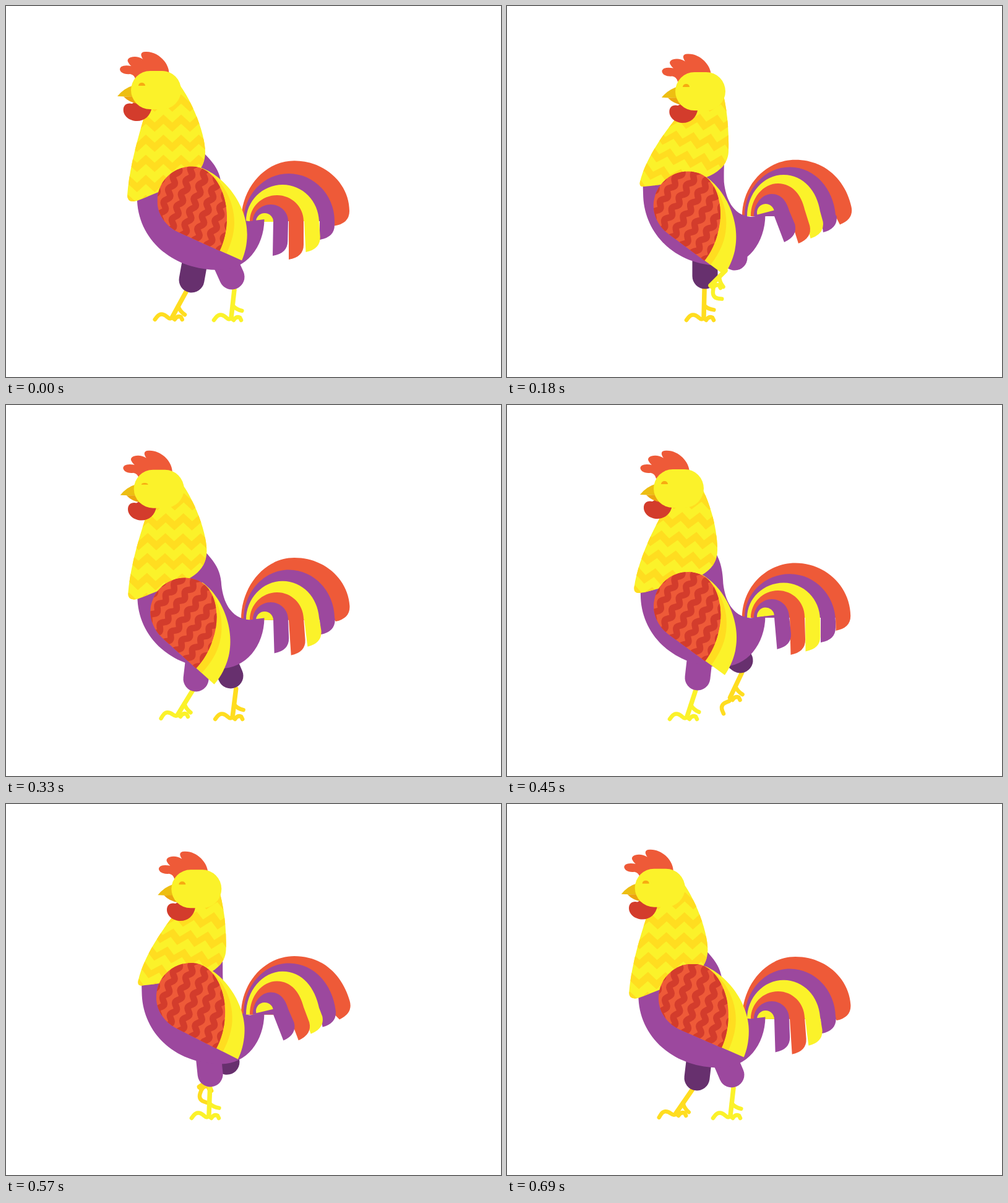
These frames come from a looping animation (800x600 px, 0.72 s). An HTML page:

```html
<!DOCTYPE html>
<html lang="en">
<head>
<meta charset="utf-8">
<title>Walking rooster</title>
<style>
html, body { margin: 0; width: 100%; height: 100%; overflow: hidden; background: #fff; }
svg { display: block; width: 100vw; height: 100vh; }
.line { fill: none; stroke-linecap: round; stroke-linejoin: round; }
</style>
</head>
<body>
<svg id="stage" viewBox="0 0 800 600">
  <defs>
    <clipPath id="neckClip"><path id="neckEdge"/></clipPath>
    <clipPath id="wingClip"><path d="M301 259C335 259 358 300 358 342C358 362 354 380 347 395L278 365C258 355 245 336 245 315C245 284 270 259 301 259Z"/></clipPath>
  </defs>
  <g id="tail"></g>
  <g id="farLeg"></g>
  <g id="nearLeg"></g>
  <path id="body" fill="#9c489e"/>
  <path id="neck" fill="#fbf22a"/>
  <path id="chevrons" fill="#ffdd20" clip-path="url(#neckClip)"/>
  <path id="comb" fill="#ee5a38" d="M264 109C264 92 246 73 226 74Q218 74 219 80Q220 84 222 86Q212 80 202 83Q195 86 198 91Q200 95 203 97Q192 95 187 98Q182 102 187 107Q193 111 201 110Q208 111 210 119L240 125Z"/>
  <path id="wattle" fill="#d33c2c" d="M234 164C232 178 222 186 210 186C198 186 188 178 188 168C188 160 194 156 202 158L215 150L234 160Z"/>
  <g id="head">
    <path fill="#edbe12" d="M180 146Q190 133 207 128V147Z"/>
    <path fill="#eda410" d="M190 146.500Q199 156 213 158V146.500Z"/>
    <rect x="202" y="105" width="81" height="62" rx="31" fill="#fbf22a"/>
    <path id="eye" fill="#f7aa12" d="M-5.500 0A5.500 5 0 0 1 5.500 0Z"/>
  </g>
  <g id="wing">
    <path fill="#fbf22a" d="M312 260C352 272 391 320 391 368C391 384 388 398 383 410L300 374Z"/>
    <path fill="#ffdd20" d="M312 260C345 272 370 310 370 350C370 368 364 386 358 399L300 374Z"/>
    <g clip-path="url(#wingClip)">
      <rect x="240" y="255" width="125" height="145" fill="#ee5a38"/>
      <path id="waves" class="line" stroke="#d33c2c" stroke-width="10.500" transform="translate(301 315) rotate(19)"/>
    </g>
  </g>
</svg>
<script>
const LOOP = 720, STEP = 30, TAU = Math.PI * 2;
const ORANGE = '#ee5a38', PURPLE = '#9c489e', YELLOW = '#fbf22a';
const $ = id => document.getElementById(id);
const put = (el, name, value) => el.setAttribute(name, value);
const move = (el, x, y, extra = '') => put(el, 'transform', `translate(${x} ${y}) ${extra}`);
const mix = (a, b, k) => a + (b - a) * k;

function add(parent, attrs) {
  const el = document.createElementNS('http://www.w3.org/2000/svg', 'path');
  for (const name in attrs) put(el, name, attrs[name]);
  parent.appendChild(el);
  return el;
}

// Each feather: base x, top x, inner x; swing triples are mean, cosine and sine parts.
const feathers = [
  { color: ORANGE, base: 380, mid: 466, inner: 531, top: [249.5, .7, 6], tipX: [534.5, -3.5, -3], tipY: [354.5, 1, 10.5] },
  { color: PURPLE, base: 384, mid: 457, inner: 507, top: [265.8, 5.2, 7.5], tipX: [509, -2, -2], tipY: [372, 6, 12] },
  { color: YELLOW, base: 388, mid: 447, inner: 482, top: [281, 8, 6.5], tipX: [487.5, -3, -5], tipY: [387, 11, 11.5] },
  { color: ORANGE, base: 394, mid: 438, inner: 457, top: [296.5, 9.5, 3.5], tipX: [464, -7, -5.5], tipY: [397, 13, 7] },
  { color: PURPLE, base: 399, mid: 428, inner: 432, top: [312.5, 8.5, 1.5], tipX: [439.5, -8.5, -3], tipY: [393, 11, 2] }
];
for (const f of feathers) f.el = add($('tail'), { fill: f.color });
const bud = add($('tail'), { fill: YELLOW, d: 'M-14 0A14 14 0 0 1 14 0Z' });

function drawTail(a, h) {
  const swing = ([m, c, s]) => m + c * Math.cos(a) + s * Math.sin(a);
  const by = 348 - 8 * h, k = .55;
  for (const f of feathers) {
    const ty = swing(f.top), x = swing(f.tipX), y = swing(f.tipY);
    const len = Math.hypot(x - f.inner, y - 320);
    const ux = (x - f.inner) / len, uy = (y - 320) / len;
    const sx = x + 24 * (uy - ux), sy = y - 24 * (ux + uy);
    const rx = f.inner + 24, ry = Math.min(348 + ty - f.top[0] - f.top[1], sy);
    const ex = ry === sy ? sx : rx, bend = k * (ry - ty);
    put(f.el, 'd', `M${f.base} ${by}C${f.base} ${mix(by, ty, k)} ${mix(f.mid, f.base, k)} ${ty} ${f.mid} ${ty}` +
      `C${mix(f.mid, ex, k)} ${ty} ${ex - ux * bend} ${ry - uy * bend} ${ex} ${ry}L${sx} ${sy}` +
      `Q${sx + ux * 20} ${sy + uy * 20} ${x} ${y}L${f.inner} ${by}Z`);
  }
  move(bud, 418, 349 - 15 * h, `rotate(${-14 * h})`);
}

// Time, knee x y, shin top x y, ankle x y, front toe angle.
const gait = [
  [0, 365, 438, 369, 459, 364, 504, 0],
  [90, 377, 413, 373, 433, 356, 473, -60],
  [150, 375, 400, 364, 420, 343, 447, -100],
  [180, 368, 407, 353, 428, 329, 452, -122],
  [270, 333, 437, 321, 452, 284, 471, -62],
  [330, 307, 443, 302, 461, 278, 500, -6],
  [360, 300, 443, 294, 462, 274, 503, 0],
  [450, 308, 441, 305, 461, 291, 504, 0],
  [510, 315, 437, 314, 458, 308, 504, 0],
  [540, 320, 437, 319, 457, 318, 504, 0],
  [630, 351, 437, 352, 458, 347, 504, 0],
  [690, 363, 438, 366, 459, 361, 504, 0]
];

function pose(t) {
  t = (t + LOOP) % LOOP;
  const n = gait.length;
  let i = n - 1;
  while (gait[i][0] > t) i--;
  const key = j => gait[(j + n) % n];
  const time = j => key(j)[0] + Math.floor(j / n) * LOOP;
  const span = time(i + 1) - time(i), u = (t - time(i)) / span;
  return key(i).slice(1).map((p, c) => {
    const q = key(i + 1)[c + 1];
    const m = (q - key(i - 1)[c + 1]) / (time(i + 1) - time(i - 1)) * span;
    const w = (key(i + 2)[c + 1] - p) / (time(i + 2) - time(i)) * span;
    return p + u * (m + u * (3 * (q - p) - 2 * m - w + u * (2 * (p - q) + m + w)));
  });
}

function makeLeg(id, skin, fill) {
  const stroke = (color, width, d = '') =>
    add($(id), { class: 'line', stroke: color, 'stroke-width': width, d });
  return {
    shin: stroke(skin, 7.5),
    spur: stroke(skin, 6.5, 'M0 -20Q6 -14 16 -13'),
    front: stroke(skin, 6.5, 'M0 1Q-4 4 -8 0Q-18 -9 -25 0L-28 4'),
    back: stroke(skin, 6.5, 'M0 1L4 4Q8 -3 14 0L16 4'),
    thigh: stroke(fill, 41)
  };
}
const near = makeLeg('nearLeg', YELLOW, PURPLE);
const far = makeLeg('farLeg', '#ffdd20', '#67306e');

function drawLeg(leg, t, reach) {
  const [kx, ky, ax, ay, jx, jy, toe] = pose(t);
  const x0 = mix(318, ax, reach), x1 = mix(318, jx, reach);
  const tilt = Math.atan2(x0 - x1, jy - ay) * 360 / TAU;
  put(leg.thigh, 'd', `M${mix(320, kx, .55)} 393L${kx} ${ky}`);
  put(leg.shin, 'd', `M${x0} ${ay}L${x1} ${jy}`);
  move(leg.spur, x1, jy, `rotate(${tilt})`);
  move(leg.front, x1, jy, `rotate(${toe})`);
  move(leg.back, x1, jy);
}

// Neck outline at both ends of the head's travel.
const neckBack = [232, 150, 222, 185, 200, 250, 196, 306, 196, 317, 207, 316, 212, 315, 288, 284, 310, 274, 322, 258, 322, 236, 322, 205, 297, 138, 262, 106];
const neckFront = [300, 152, 262, 190, 224, 245, 215, 284, 213, 293, 221, 292, 232, 291, 306, 282, 335, 275, 358, 260, 358, 234, 359, 190, 354, 152, 343, 120];
const neckShape = ['M', 'C', '', '', 'Q', '', 'L', 'L', 'C', '', '', 'C', '', ''];

function drawNeck(h, dy) {
  const d = neckShape.map((cmd, i) => {
    const x = mix(neckBack[2 * i], neckFront[2 * i], h);
    const y = mix(neckBack[2 * i + 1], neckFront[2 * i + 1], h);
    return `${cmd}${x} ${y} `;
  }).join('') + 'Z';
  put($('neck'), 'd', d);
  put($('neckEdge'), 'd', d);

  const warp = (x, y) => {
    const u = (y - 136) / 170, side = (x - 196) / 126;
    return `${x + h * (70 - u * (51 + 6 * side))} ${y + dy - h * u * 26 * (1 - side)}`;
  };
  let bands = '';
  for (let row = 0; row < 6; row++) {
    const top = [], low = [];
    for (let n = -8; n <= 5; n++) {
      const x = 283 + n * 14.25, y = 143 + row * 32.5 + (n & 1) * 13;
      top.push(warp(x, y));
      low.unshift(warp(x, y + 15));
    }
    bands += 'M' + top.concat(low).join('L') + 'Z';
  }
  put($('chevrons'), 'd', bands);
}

function drawHead(t, a, h, dy) {
  const dx = 70 * h, deg = TAU / 360;
  const lag = Math.cos(a - 255 * deg);
  move($('head'), dx, dy);
  move($('comb'), dx - 2.3 - 2.5 * Math.cos(a - 135 * deg), dy + 1.5 * h);
  move($('wattle'), dx + 3 + 5.2 * lag, dy + .5 + 1.5 * lag);
  const blink = 1 - .9 * Math.max(0, 1 - Math.abs(t - 360) / 60);
  move($('eye'), 219.5, 129, `scale(1 ${blink})`);
}

function drawBody(t, h) {
  put($('body'), 'd', `M211 285L212 316C215 375 265 427 345 427C388 427 417 390 417.500 345` +
    `L393 348C362 345 351 318 348 292C347 268 ${336 + 14 * h} 254 ${320 + 26 * h} 238Z`);
  put($('body'), 'transform', `translate(${417 * .04 * h} ${-7 * h}) scale(${1 - .04 * h} 1)`);
  const s = (1 - Math.cos((t - 672) / LOOP * TAU)) / 2;
  move($('wing'), -12 * s, 21.5 * s - 6 * h - .5, `rotate(${18.7 * s} 301 315)`);
}

function drawWaves() {
  let d = '';
  for (let i = -4; i <= 4; i++) {
    for (let y = -90; y <= 110; y += 2) {
      const x = i * 22 + 5 + 3.5 * Math.sin(y / 22 * TAU);
      d += `${y === -90 ? 'M' : 'L'}${x.toFixed(1)} ${y}`;
    }
  }
  put($('waves'), 'd', d);
}

function render(t) {
  const a = t / LOOP * 2 * TAU, h = (1 - Math.cos(a)) / 2;
  const dy = 2 * h - 8 * h * (1 - h);
  drawTail(a, h);
  drawLeg(far, t + LOOP / 2, 1.12);
  drawLeg(near, t, 1);
  drawBody(t, h);
  drawNeck(h, dy);
  drawHead(t, a, h, dy);
}

const start = performance.now();
function tick() {
  const t = (performance.now() - start) % LOOP;
  render(Math.floor(t / STEP) * STEP);
  requestAnimationFrame(tick);
}
drawWaves();
tick();
</script>
</body>
</html>
```
